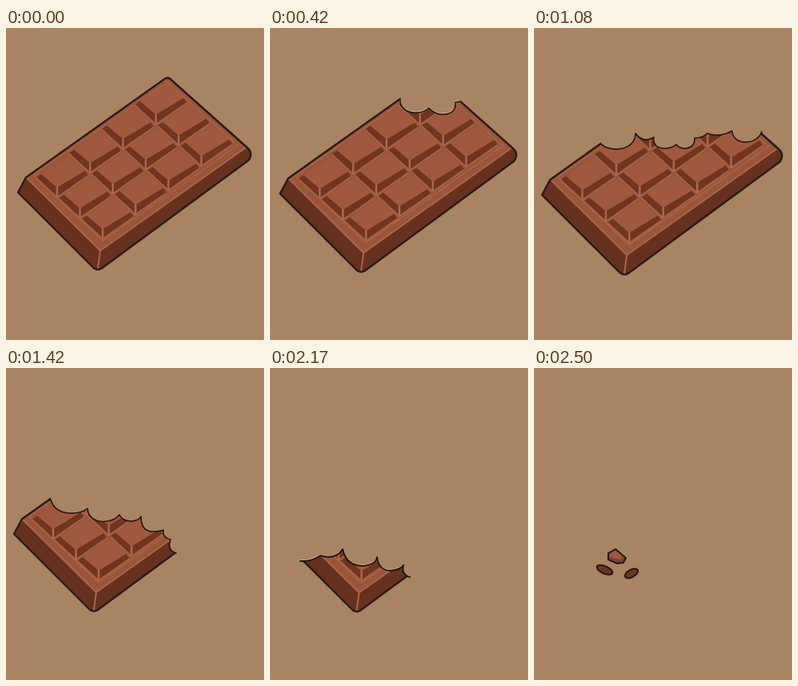
Recreate the animation shown at these times as an HTML page. Size 323x391 px, loop 2.83 s.

```html
<!DOCTYPE html>
<html lang="en">
<head>
<meta charset="utf-8">
<title>Chocolate bar</title>
<style>
  html, body { margin: 0; width: 100%; height: 100%; overflow: hidden; background: #a88463; }
  #stage { position: absolute; left: 0; top: 0; width: 323px; height: 391px; overflow: hidden; contain: strict; }
  #stage svg { display: block; overflow: hidden; }
  #strip { animation: advance 2830ms step-end infinite; }
  /* Poses lie side by side; the strip jumps one stage width at a time. */
  @keyframes advance {
    0% { transform: translateX(0); }
    14.841% { transform: translateX(-323px); }
    26.502% { transform: translateX(-646px); }
    38.163% { transform: translateX(-969px); }
    50.177% { transform: translateX(-1292px); }
    61.837% { transform: translateX(-1615px); }
    76.678% { transform: translateX(-1938px); }
    88.339%, 100% { transform: translateX(-2261px); }
  }
</style>
</head>
<body>
<div id="stage">
<svg width="323" height="391" viewBox="0 0 323 391">
  <defs>
    <path id="shell" d="M15 206L25 187.300 198 64.200Q203 60 208 66L301 149Q310 156 304 165.500L119 301.800Q115 304 110 301Z"/>
    <g id="bar" stroke-linejoin="round" stroke-linecap="round">
      <use href="#shell" fill="#67311f"/>
      <path fill="#99563b" d="M25 187.500L198 65Q203 61 208 67L300 150 118 279Z"/>
      <path fill="none" stroke="#aa6548" stroke-width="2" d="M26 188L118 279 300 150M118 279L115 301"/>
      <path fill="none" stroke="#a86347" stroke-width="1.500" d="M34 184L202 68 290 147 121 267Z"/>
      <g id="cells"></g>
      <use href="#shell" fill="none" stroke="#2a1a17" stroke-width="2.400"/>
    </g>
  </defs>
  <g id="strip">
    <g id="poses"></g>
    <g transform="translate(2261)" stroke="#251713" stroke-width="2" stroke-linejoin="round">
      <path fill="#7d412d" d="M93 232L102 227 109 233 115 238 112 244 104 245 93 240Z"/>
      <path fill="#9c5b40" stroke="none" d="M95 233L102 228.500 112 237 107 240 95 237Z"/>
      <ellipse fill="#6d3422" rx="10.500" ry="4.600" transform="translate(88.500 253) rotate(23)"/>
      <ellipse fill="#6d3422" rx="9" ry="4.600" transform="translate(122 257.500) rotate(-29)"/>
    </g>
  </g>
</svg>
</div>
<script>
  const STAGE = 323;
  const origin = [35.5, 185], across = [28.5, 26], along = [41.2, -30.4];

  const poly = (points, fill) => `<polygon points="${points.join(' ')}" fill="${fill}"/>`;
  const shift = ([x, y], dx, dy) => [x + dx, y + dy];
  const corner = (col, row) => origin.map((o, k) => o + across[k] * col + along[k] * row);

  // Each square is a raised face with two dark bevels meeting at its lowest corner.
  function cell(col, row) {
    const bottom = corner(col + 1, row);
    const left = shift(bottom, -26, -24);
    const right = shift(bottom, 38.5, -27);
    const innerBottom = shift(bottom, 0, -11);
    const innerLeft = shift(left, 6, -4);
    const innerRight = shift(right, -4, -5);
    const top = shift(innerLeft, 34, -22);
    return poly([innerLeft, innerBottom, innerRight, top], '#a0593e') +
      poly([left, bottom, innerBottom, innerLeft], '#70351f') +
      poly([bottom, right, innerRight, innerBottom], '#70351f') +
      `<path fill="none" stroke="#a86347" stroke-width="1.5" ` +
      `d="M${shift(left, 0, 1.5)}L${shift(bottom, 0, 1.5)} ${shift(right, 0, 1.5)}"/>` +
      `<path stroke="#ad694b" stroke-width="2.4" d="M${innerBottom}L${bottom}"/>`;
  }

  let cells = '';
  for (let row = 3; row >= 0; row--)
    for (let col = 0; col < 3; col++) cells += cell(col, row);
  document.getElementById('cells').innerHTML = cells;

  const grown = s => `translate(175 102) scale(${s}) translate(-175 -102)`;
  const moved = (x, y) => `translate(${x} ${y})`;

  // "edge" is the bitten contour; "keep" closes it around what is left of the bar.
  const open = 'V0H323V391H0V0H';
  const halfEdge = 'M56 165Q61 182 82 182Q95 182 102 176Q104 192 122 192.500Q136 192 142 184' +
    'Q146 192 157 192Q167 191 169 186Q169 205 184 205Q192 205 197 203Q195 212 206 215Q201 228 213 232';
  const halfKeep = 'V391H0V0H56Z';
  const poses = [
    { at: grown(1) },
    { at: grown(1.015), edge: 'M163 88C161 108 189 111 199 100C207 112 235 112 232 93L238 92',
      keep: open + '163Z', rim: true },
    { at: grown(1.031), edge: 'M136 107C138 127 165 127 171 115Q178 124 192 123Q206 122 212 114' +
      'C220 128 246 127 256 108', keep: open + '136Z' },
    { at: grown(1.031), edge: 'M84 145C93 156 127 155 127 132Q137 145 150 137Q148 151 165 151' +
      'Q174 150 178 146Q182 151 190 151Q202 149 201 138Q211 138 217 132Q231 138 248 129' +
      'C249 148 280 147 285 130', keep: open + '84Z' },
    { at: moved(-5, 2), edge: halfEdge, keep: halfKeep },
    { at: moved(-5, 2), edge: halfEdge, keep: halfKeep, nudge: moved(-2, 1) },
    { at: moved(-6.5, 2.5), edge: 'M38 242Q52 243 63 235Q82 241 91 227Q95 247 115 248' +
      'Q133 247 134 237Q136 253 150 254Q164 253 167 247Q164 259 175 262',
      keep: 'V391H37V242Z', rim: true, weight: 2 }
  ];

  document.getElementById('poses').innerHTML = poses.map((pose, i) => {
    const { at, edge, keep, rim, nudge = '', weight = 1.6 } = pose;
    const bar = `<use href="#bar" transform="${at}"/>`;
    const line = (color, width, dy) => `<path d="${edge}" transform="translate(0 ${dy})" ` +
      `fill="none" stroke="${color}" stroke-width="${width}" stroke-linejoin="round" stroke-linecap="round"/>`;
    const art = edge
      ? `<clipPath id="keep${i}"><path d="${edge}${keep}"/></clipPath>` +
        `<g clip-path="url(#keep${i})">${bar}</g>` +
        (rim ? line('#d3b592', 1.2, -1.2) : '') + line('#21140f', weight, 0)
      : bar;
    return `<g transform="translate(${i * STAGE}) ${nudge}">${art}</g>`;
  }).join('');
</script>
</body>
</html>
```
